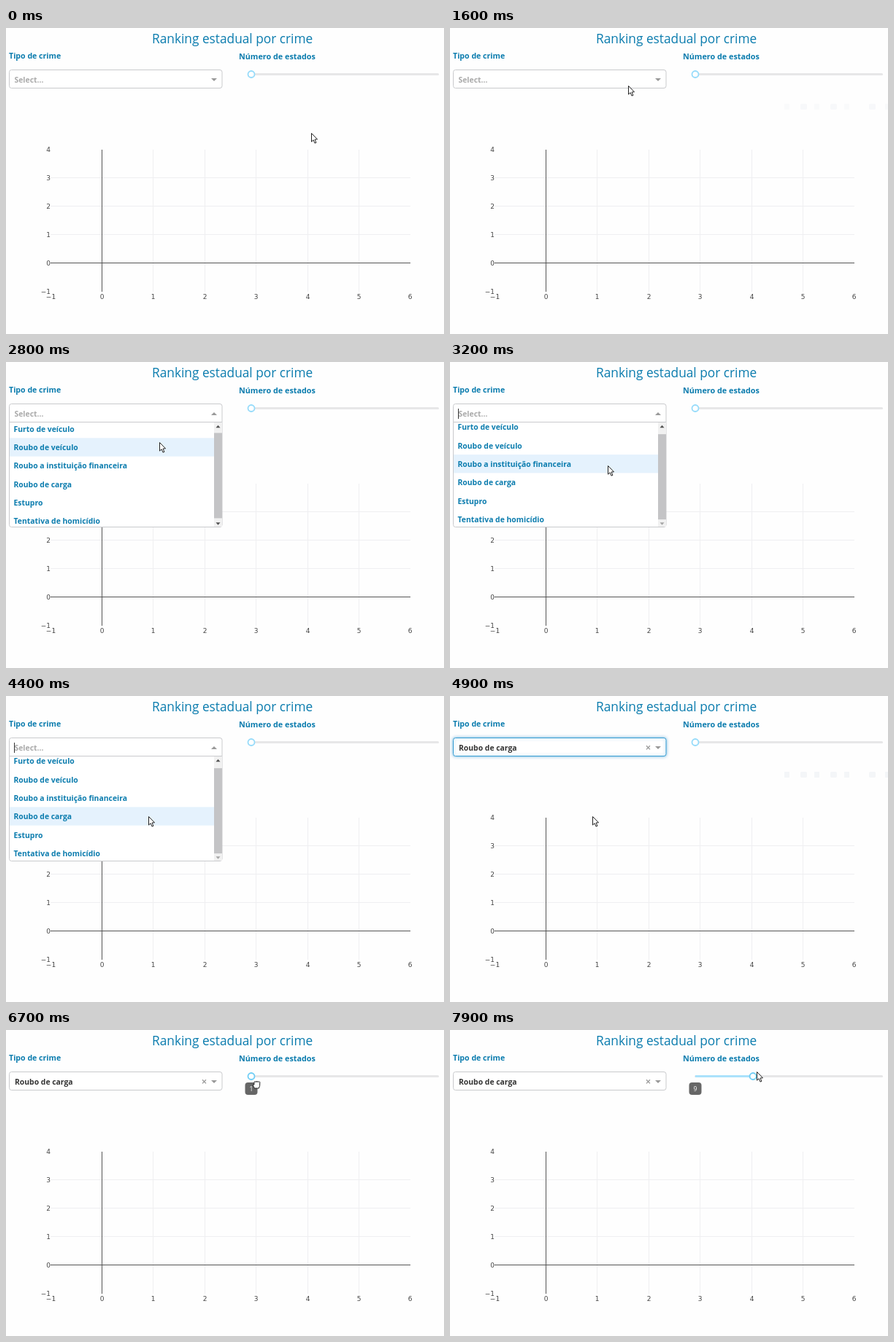
Recreate the animation shown at these times as an HTML page with a canvas. Size 600 by 420 pixels, loop 8 s.

```html
<!DOCTYPE html>
<html lang="pt">
<head>
<meta charset="utf-8">
<title>Ranking estadual por crime</title>
<style>
html, body { margin: 0; width: 100%; height: 100%; overflow: hidden; background: #fefefe; }
canvas { display: block; }
</style>
</head>
<body>
<canvas id="stage" width="600" height="420"></canvas>
<script>
const ctx = document.getElementById('stage').getContext('2d');
const LOOP = 8000, STEP = 100;
const SANS = '"Open Sans", "Noto Sans", sans-serif';
const MONO_DIGITS = '"DejaVu Sans", sans-serif';
const BLUE = '#0b7cae', BG = '#fefefe';
const OPTIONS = ['Furto de veículo', 'Roubo de veículo', 'Roubo a instituição financeira',
  'Roubo de carga', 'Estupro', 'Tentativa de homicídio'];
const ROW = 25.3, MENU_TOP = 84, MENU_END = 226, MAX_SCROLL = 7.5;
const RAIL = 336, RAIL_END = 593, STATES = 27;
const UNIT = (RAIL_END - RAIL) / (STATES - 1);

// Pointer path: time, x, y
const PATH = [
  [0, 418, 144], [1000, 418, 144], [1300, 420, 103], [1700, 211, 75], [2400, 211, 75],
  [2500, 206, 89], [3200, 216, 142], [3300, 216, 142], [4000, 195, 165], [5200, 195, 165],
  [5700, 402, 50], [6100, 343, 75], [6700, 343, 75], [7600, 413, 60], [7900, 420, 57], [8000, 420, 57]
];

const clamp = (v, a = 0, b = 1) => Math.min(b, Math.max(a, v));
const ramp = (t, a, b) => clamp((t - a) / (b - a));
const ease = u => u * u * (3 - 2 * u);

function pointerAt(t) {
  const i = PATH.findIndex((p, k) => k && t < p[0]);
  const [t0, x0, y0] = PATH[i - 1], [t1, x1, y1] = PATH[i];
  const u = ease(ramp(t, t0, t1));
  return [x0 + (x1 - x0) * u, y0 + (y1 - y0) * u];
}

function text(str, x, y, font, color, align = 'left') {
  ctx.font = font;
  ctx.fillStyle = color;
  ctx.textAlign = align;
  ctx.fillText(str, x, y);
}

function rect(x, y, w, h, color) {
  ctx.fillStyle = color;
  ctx.fillRect(x, y, w, h);
}

function round(x, y, w, h, r, fill, stroke) {
  ctx.beginPath();
  ctx.roundRect(x, y, w, h, r);
  if (fill) { ctx.fillStyle = fill; ctx.fill(); }
  if (stroke) { ctx.strokeStyle = stroke; ctx.lineWidth = 1; ctx.stroke(); }
}

function poly(points, fill) {
  ctx.beginPath();
  points.forEach(([x, y]) => ctx.lineTo(x, y));
  ctx.closePath();
  ctx.fillStyle = fill;
  ctx.fill();
}

function triangle(x, y, w, h, color) {
  poly([[x - w, y + h], [x + w, y + h], [x, y - h]], color);
}

function drawHeader() {
  text('Ranking estadual por crime', 200, 21, `500 17.3px ${SANS}`, BLUE);
  text('Tipo de crime', 4, 42, `bold 10.6px ${SANS}`, BLUE);
  text('Número de estados', 319, 43, `bold 10.8px ${SANS}`, BLUE);
}

function drawPlot() {
  const gx = n => Math.round(131 + 70.4 * n), gy = n => Math.round(322 - 39 * n);
  for (let n = 1; n <= 5; n++) rect(gx(n), 167, 1, 195, '#efeff1');
  for (let n = 1; n <= 3; n++) rect(61, gy(n), 493, 1, '#efeff1');
  rect(131, 167, 1, 195, '#555');
  rect(61, 322, 493, 1, '#555');
  const font = `9px ${MONO_DIGITS}`, label = n => String(n).replace('-', '−');
  for (let n = -1; n <= 6; n++) text(label(n), gx(n) + 0.5, 372, font, '#444', 'center');
  for (let n = -1; n <= 4; n++) text(label(n), 61, gy(n) + 4, font, '#444', 'right');
}

function drawModebar(alpha) {
  if (alpha <= 0) return;
  ctx.globalAlpha = alpha;
  [458, 480, 499, 521, 540, 574, 596].forEach((x, i) => {
    if (i % 2) round(x, 104, 9, 8, 2, '#e9edf2');
    else rect(x, 104, 7, 8, '#eceff3');
  });
  ctx.globalAlpha = 1;
}

function drawSelect(t) {
  const open = t >= 1900 && t < 4800, chosen = t >= 4800, focus = chosen && t < 6700;
  if (focus) {
    ctx.shadowColor = 'rgba(0,126,200,.5)';
    ctx.shadowBlur = 4;
  }
  round(4.5, 57.5, 291.5, 25, open ? [3, 3, 0, 0] : 3, '#fff', focus ? '#3a9fd4' : '#c9cacd');
  ctx.shadowBlur = 0;
  if (chosen) {
    text('Roubo de carga', 12, 74.5, `bold 10.4px ${SANS}`, '#333');
    ctx.strokeStyle = '#999';
    ctx.lineWidth = 1.3;
    ctx.beginPath();
    ctx.moveTo(269, 68.2); ctx.lineTo(274, 73.4);
    ctx.moveTo(274, 68.2); ctx.lineTo(269, 73.4);
    ctx.stroke();
  } else {
    text('Select...', 11.5, 74.5, `bold 10.4px ${SANS}`, '#aaa');
  }
  triangle(285, 71, 4, open ? 2 : -2, '#999');
  // Caret blinks with a period of 1100 ms
  if (open && (t < 2100 || (t - 2100) % 1100 < 600)) rect(11, 64, 1, 14, '#333');
}

function drawMenu(t, y) {
  const scroll = MAX_SCROLL * ramp(t, 2600, 2900);
  const hover = clamp(Math.floor((y - MENU_TOP + scroll) / ROW), 0, 5);
  round(4.5, 82.5, 291.5, 144, [0, 0, 3, 3], '#fff', '#c9cacd');
  ctx.save();
  ctx.beginPath();
  ctx.rect(5, 83, 280, MENU_END - 83);
  ctx.clip();
  OPTIONS.forEach((name, i) => {
    const top = MENU_TOP + ROW * i - scroll;
    if (i === hover) rect(5, top, 280, ROW, '#e5f2fd');
    text(name, 10.5, top + 16.8, `bold 10.4px ${SANS}`, BLUE);
  });
  ctx.restore();
  rect(285, 83, 11, 143, '#f1f1f1');
  rect(285, 94 + scroll * 0.68, 11, 117, '#c4c4c6');
  const atTop = scroll < 0.5, atEnd = scroll > MAX_SCROLL - 0.5;
  triangle(290.5, 88.5, 3, 1.7, atTop ? '#a5a5a5' : '#505050');
  triangle(290.5, 222, 3, -1.7, atEnd ? '#a5a5a5' : '#505050');
}

function drawSlider(t, x) {
  const value = t < 6700 ? 1 : Math.round(1 + (x - 343) / UNIT);
  const thumb = RAIL + UNIT * (value - 1), active = t >= 6200;
  round(RAIL - 1, 62, RAIL_END - RAIL + 1, 3, 1.5, '#e7e7e8');
  if (value > 1) rect(RAIL, 62, thumb - RAIL, 3, '#abe2fb');
  ctx.beginPath();
  ctx.arc(thumb, 63.5, 4.5, 0, 7);
  ctx.fillStyle = '#fff';
  ctx.fill();
  ctx.strokeStyle = active ? '#6fcdf5' : '#96dbfa';
  ctx.lineWidth = 1.8;
  ctx.stroke();
  ctx.globalAlpha = ramp(t, 6100, 6400);
  round(327.5, 72, 17, 17, 4, '#666');
  text(value, 336, 83.8, `8.5px ${SANS}`, '#fff', 'center');
  ctx.globalAlpha = 1;
}

function drawArrow(x, y) {
  ctx.save();
  ctx.translate(x + 0.5, y + 0.5);
  poly([[0, 0], [0, 11.6], [2.6, 9.2], [4.5, 13.6], [6.4, 12.8], [4.5, 8.5], [8, 8.3]], '#fff');
  ctx.strokeStyle = '#222';
  ctx.lineWidth = 1;
  ctx.stroke();
  ctx.restore();
}

function drawHand(x, y) {
  ctx.save();
  ctx.translate(x, y);
  ctx.beginPath();
  ctx.moveTo(-2.5, 5);
  ctx.lineTo(-4.7, 1);
  ctx.quadraticCurveTo(-5, -0.8, -3, 0);
  ctx.lineTo(-3.2, -3);
  for (let i = 0; i < 4; i++) ctx.quadraticCurveTo(-2.2 + 2 * i, -6.6 + Math.abs(i - 1.3) * 0.7, -1.2 + 2 * i, -3.4);
  ctx.lineTo(4.6, 1.5);
  ctx.lineTo(3.3, 5);
  ctx.closePath();
  ctx.fillStyle = '#fff';
  ctx.fill();
  ctx.strokeStyle = '#222';
  ctx.lineWidth = 1;
  ctx.stroke();
  ctx.restore();
}

function draw(t) {
  const [x, y] = pointerAt(t);
  rect(0, 0, 600, 420, BG);
  drawHeader();
  drawPlot();
  if (t >= 1400 && t < 1700) drawModebar(1 - ramp(t, 1400, 1700));
  if (t >= 4800) drawModebar(ramp(t, 4700, 5100) * (1 - 0.6 * ramp(t, 5400, 5700)) * (1 - ramp(t, 5700, 6000)));
  drawSelect(t);
  if (t >= 1900 && t < 4800) drawMenu(t, y);
  drawSlider(t, x);
  if (t >= 1000 && t < 1400) return;
  if (t >= 6100 && t < 7600) drawHand(x, y);
  else drawArrow(Math.round(x), Math.round(y));
}

function frame(now) {
  draw(Math.floor((now % LOOP) / STEP) * STEP);
  requestAnimationFrame(frame);
}
requestAnimationFrame(frame);
</script>
</body>
</html>
```
